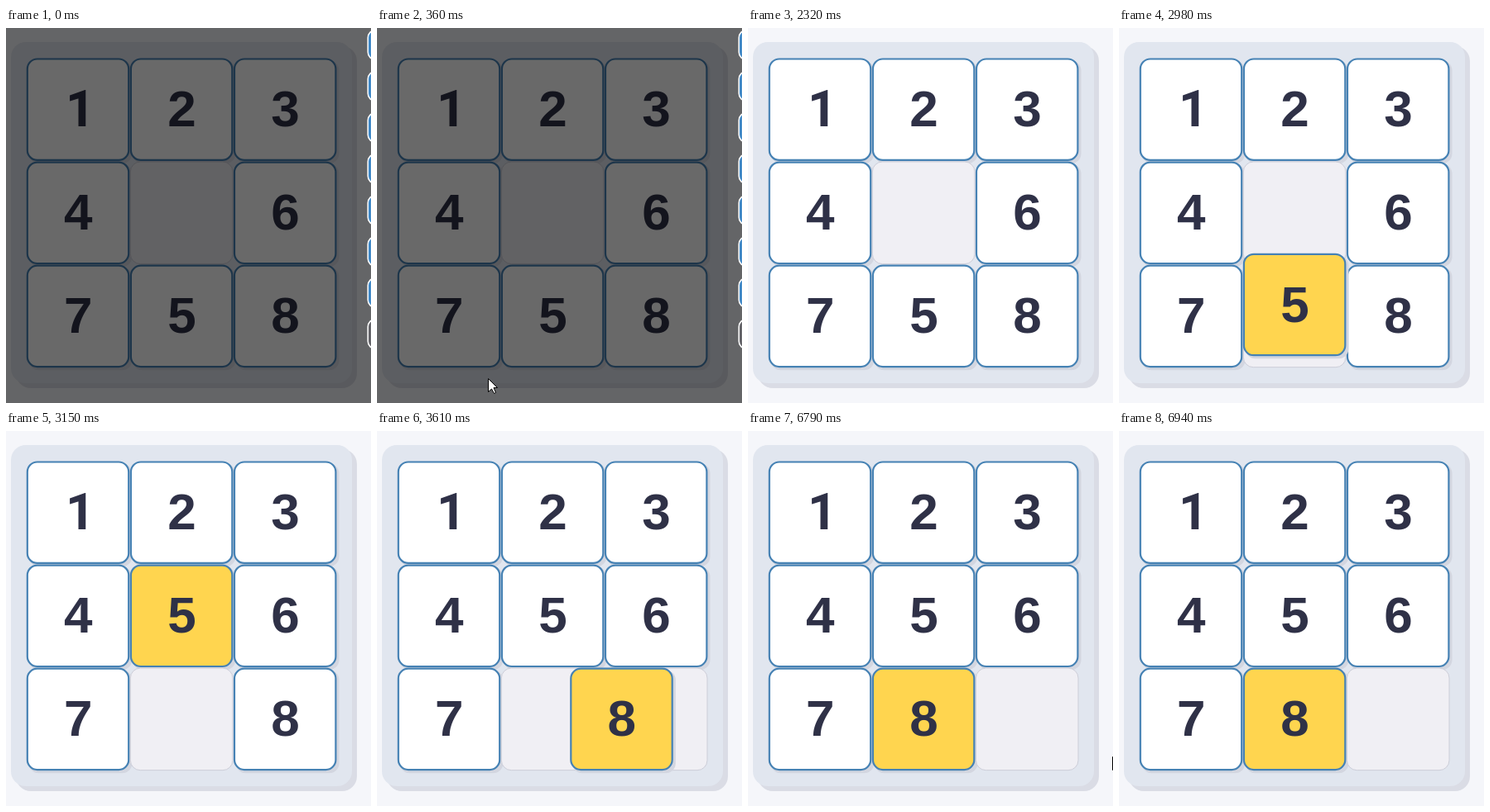
An HTML page with a canvas for the animation above (8360 ms loop, 441x454 px).

```html
<!DOCTYPE html>
<html lang="en">
<head>
<meta charset="utf-8">
<title>Sliding puzzle</title>
<style>
  html, body { margin: 0; width: 100%; height: 100%; overflow: hidden; background: #f5f6fa; }
  canvas { display: block; }
</style>
</head>
<body>
<canvas id="stage" width="441" height="454"></canvas>
<script>
const ctx = document.getElementById('stage').getContext('2d');
const LOOP = 8360, PITCH = 125.1, SIZE = 124.6, LEFT = 24.7, TOP = 36.4;
const START = [1, 2, 3, 4, 0, 6, 7, 5, 8];
const MOVES = [
  { tile: 5, from: 7, to: 4, start: 2930, end: 3150 },
  { tile: 8, from: 8, to: 7, start: 3560, end: 3760 },
];
const STEPS = 5;
const POINTER = [
  { start: 360, end: 410, x: 134, y: 424 },
  { start: 6790, end: 6840, x: 440, y: 394 },
  { start: 6840, end: 6890, x: 428, y: 410 },
  { start: 6890, end: 6940, x: 424, y: 427 },
];

function box(x, y, w, h, r, fill, stroke, line = 0) {
  ctx.beginPath();
  ctx.roundRect(x + line / 2, y + line / 2, w - line, h - line, r);
  if (fill) {
    ctx.fillStyle = fill;
    ctx.fill();
  }
  if (stroke) {
    ctx.strokeStyle = stroke;
    ctx.lineWidth = line;
    ctx.stroke();
  }
}

const place = cell => ({
  x: LEFT + (cell % 3) * PITCH,
  y: TOP + Math.floor(cell / 3) * PITCH,
});

function drawSlot({ x, y }) {
  box(x, y, SIZE, SIZE, 12, '#f0eff4', '#cccdd8', 1);
}

function drawTile(n, { x, y }, active) {
  box(x + 3, y + 3, SIZE, SIZE, 12, '#d3d6e0');
  box(x, y, SIZE, SIZE, 12, active ? '#ffd54f' : '#ffffff', '#4682b4', 2.2);
  // Roboto has a "1" without a foot
  const one = n === 1;
  ctx.font = one ? 'bold 62px Roboto, sans-serif'
                 : 'bold 62px "Liberation Sans", Arial, sans-serif';
  ctx.fillStyle = '#2f3147';
  ctx.fillText(n, x + (one ? 65 : 62.6), y + 82.8);
}

function drawBoard(t) {
  const cells = [...START];
  let active = 0, moving = null;
  for (const m of MOVES) {
    if (t < m.start) break;
    cells[m.from] = 0;
    cells[m.to] = active = m.tile;
    if (t < m.end) moving = m;
  }
  if (moving) cells[moving.to] = 0;

  box(12, 22, 412, 414, 18, '#dadce5');
  box(6, 17, 412, 413, 18, '#e1e6ef');
  cells.forEach((n, i) => n ? drawTile(n, place(i), n === active) : drawSlot(place(i)));

  if (moving) {
    const { start, end, from, to, tile } = moving;
    const step = Math.floor((t - start) / (end - start) * (STEPS - 1));
    const p = (step + 0.5) / (STEPS - 0.5);
    const a = place(from), b = place(to);
    drawTile(tile, { x: a.x + (b.x - a.x) * p, y: a.y + (b.y - a.y) * p }, true);
  }
}

function drawMenu() {
  ctx.fillStyle = 'rgba(0, 0, 0, 0.588)';
  ctx.fillRect(0, 0, 441, 454);
  for (let i = 0; i < 8; i++) {
    box(436.5, 2 + i * 50, 120, 37, 9, i < 7 ? '#4189c7' : '#646469', '#ffffff', 1.5);
  }
}

function drawPointer({ x, y }) {
  const arrow = [[0, 0], [0, 16], [4, 12.5], [7, 18], [9, 17], [6.5, 11], [11, 11]];
  ctx.beginPath();
  arrow.forEach(([dx, dy]) => ctx.lineTo(x + dx + 0.5, y + dy + 0.5));
  ctx.closePath();
  ctx.fillStyle = '#ffffff';
  ctx.fill();
  ctx.strokeStyle = '#000000';
  ctx.lineWidth = 1;
  ctx.stroke();
}

function draw(t) {
  ctx.fillStyle = '#f5f6fa';
  ctx.fillRect(0, 0, 441, 454);
  drawBoard(t);
  if (t < 2320) drawMenu();
  const pointer = POINTER.find(p => t >= p.start && t < p.end);
  if (pointer) drawPointer(pointer);
}

ctx.textAlign = 'center';
const begin = performance.now();
function frame() {
  draw((performance.now() - begin) % LOOP);
  requestAnimationFrame(frame);
}
frame();
</script>
</body>
</html>
```
